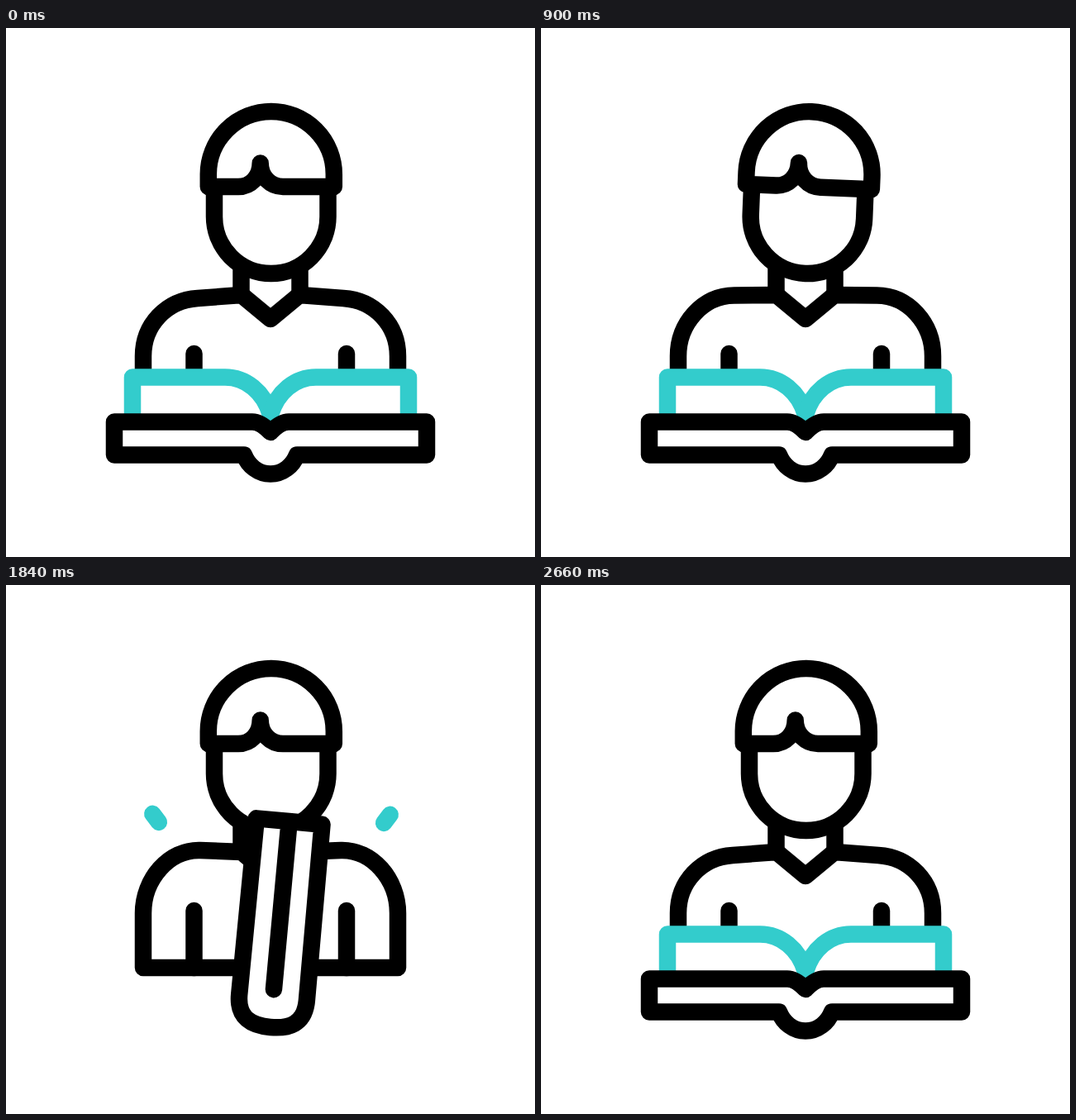
Animation, 640 px wide and 640 px high, one loop 3600 ms. Source, as an HTML page:

```html
<!DOCTYPE html>
<html lang="en">
<head>
<meta charset="utf-8">
<title>Reader</title>
<style>
html, body { margin: 0; width: 100%; height: 100%; overflow: hidden; background: #fff; }
svg { display: block; width: 100vw; height: 100vh; }
path { fill: none; stroke: #000; stroke-width: 20.5; stroke-linecap: round; stroke-linejoin: round; }
.solid { fill: #fff; }
.teal { stroke: #3cc; }
</style>
</head>
<body>
<svg viewBox="0 0 640 640">
  <path d="M284.5 288V323M355.5 288V323"/>
  <path id="body"/>
  <path d="M227.5 394V463M412 394V463"/>
  <g id="head">
    <path class="solid" d="M252 192V228.3A68.7 68.7 0 0 0 389.5 228.3V192"/>
    <path class="solid" d="M244.8 192V177A76 76 0 0 1 396.8 177V192H335C320 192 307.7 180 307.7 163.5C307.7 180 296 192 281 192Z"/>
  </g>
  <g id="book">
    <path id="pageL" class="solid teal"/>
    <path id="pageR" class="solid teal"/>
    <path id="cover" class="solid"/>
  </g>
  <path id="sparkL" class="teal"/>
  <path id="sparkR" class="teal" transform="matrix(-1 0 0 1 642 1)"/>
</svg>
<script>
const LOOP = 3600;
const HINGE = [320, 489];
const el = id => document.getElementById(id);
const clamp = v => Math.max(0, Math.min(1, v));
const mix = (a, b, k) => a + (b - a) * k;
const wave = k => (1 - Math.cos(Math.PI * k)) / 2;
const smooth = k => k * k * (3 - 2 * k);
const span = (t, start, length) => clamp((t - start) / length);
const bump = (t, centre, reach) => wave(1 - clamp(Math.abs(t - centre) / reach));
const move = (id, value) => el(id).setAttribute('transform', value);
const draw = (id, d) => el(id).setAttribute('d', d);
const pt = p => p[0].toFixed(2) + ' ' + p[1].toFixed(2);
const flip = p => [640 - p[0], p[1]];

// two nods, three breaths, then one slam of the book
const nod = t => t < 1900 ? 11.3 * smooth(wave(t / 475)) : 0;
const turn = t => 2.4 * bump(t, 930, 370) + 1.7 * bump(t, 2240, 370) - 5.1 * bump(t, 560, 370);
const breath = t => t < 2480 ? wave(t / 620) : 0;
const fold = t => 90 * (span(t, 1480, 280) ** 2 - wave(span(t, 2095, 400)));
const rock = t => 7.2 * (1 - span(t, 1740, 700)) ** 2 * Math.sin(Math.PI * Math.max(0, t - 1740) / 200);

// page outlines relative to the hinge: corner, bend, two controls, root
const openPage = s => [[-167 * s, -66.5], [-55 * s, -66.5], [-30 * s, -66.5], [-8 * s, -49], [0, -21]];
const halfPage = s => [[-89 * s, -163], [6 - 6 * s, -90 + 5 * s], [-20, -71], [-17, -40], [0, -12]];
const shutPage = s => halfPage(s).map(([, y]) => [0, y * 1.1]);

function drawPage(id, side, deg, base) {
  const [from, to, k] = deg < 58
    ? [openPage(side), halfPage(side), deg / 58]
    : [halfPage(side), shutPage(side), (deg - 58) / 32];
  const p = from.map(([x, y], i) => pt([
    HINGE[0] + mix(x, to[i][0], k),
    HINGE[1] + mix(y, to[i][1], k)
  ]));
  draw(id, `M${pt(base)}L${p[0]}L${p[1]}C${p[2]} ${p[3]} ${p[4]}`);
}

function drawBook(deg) {
  const a = deg * Math.PI / 180, sin = Math.sin(a), cos = Math.cos(a);
  const shut = span(deg, 60, 30);
  const len = 189 + 15 * shut;
  const lift = -12.5 * (1 - clamp(deg / 58));
  // point on the left board: distance from hinge, depth below its inner face
  const at = (d, n) => [HINGE[0] - d * cos - n * sin, HINGE[1] - d * sin + n * cos];
  const tip = at(len, lift), edge = at(len, lift + 40);
  const near = at(22, lift), c1 = at(13, lift), c2 = at(6, lift / 2);
  const spine = at(32 - 42 * sin, lift + 40 + shut);
  const low = HINGE[1] + 50.5 - 4.5 * shut;
  const s1 = [spine[0] + 5 * (1 - shut), spine[1] + 13 + 16 * shut];
  const s2 = [305 - 7 * shut, low];
  const f = p => pt(flip(p));
  draw('cover',
    `M${pt(edge)}L${pt(tip)}L${pt(near)}C${pt(c1)} ${pt(c2)} ${pt(HINGE)}` +
    `C${f(c2)} ${f(c1)} ${f(near)}L${f(tip)}L${f(edge)}L${f(spine)}` +
    `C${f(s1)} ${f(s2)} ${pt([320, low])}C${pt(s2)} ${pt(s1)} ${pt(spine)}Z`);
  const base = at(167, 0);
  drawPage('pageL', 1, deg, base);
  drawPage('pageR', -1, deg, flip(base));
}

function drawBody(rise) {
  const x = 232 + 3 * rise, y = 327 - 6 * rise;
  const side = [166, 359 - 3 * rise], top = [x, y], bend = [x - 38, y + (y - 323) * 0.6];
  draw('body',
    `M166 463V397C${pt(side)} ${pt(bend)} ${pt(top)}L285 323L320 352L355 323` +
    `L${pt(flip(top))}C${pt(flip(bend))} ${pt(flip(side))} 474 397V463Z`);
}

function drawSparks(u) {
  const along = k => pt([mix(188, 171, k), mix(291, 268.5, k)]);
  const d = u > 0 && u < 1 ? `M${along(u ** 2.5)}L${along(1 - (1 - u) ** 1.4)}` : '';
  draw('sparkL', d);
  draw('sparkR', d);
}

function frame() {
  const t = performance.now() % LOOP;
  move('head', `translate(0 ${nod(t)}) rotate(${turn(t)} 320 270)`);
  move('book', `rotate(${rock(t)} 320 532)`);
  drawBody(breath(t));
  drawBook(fold(t));
  drawSparks((t - 1760) / 160);
  requestAnimationFrame(frame);
}
frame();
</script>
</body>
</html>
```
